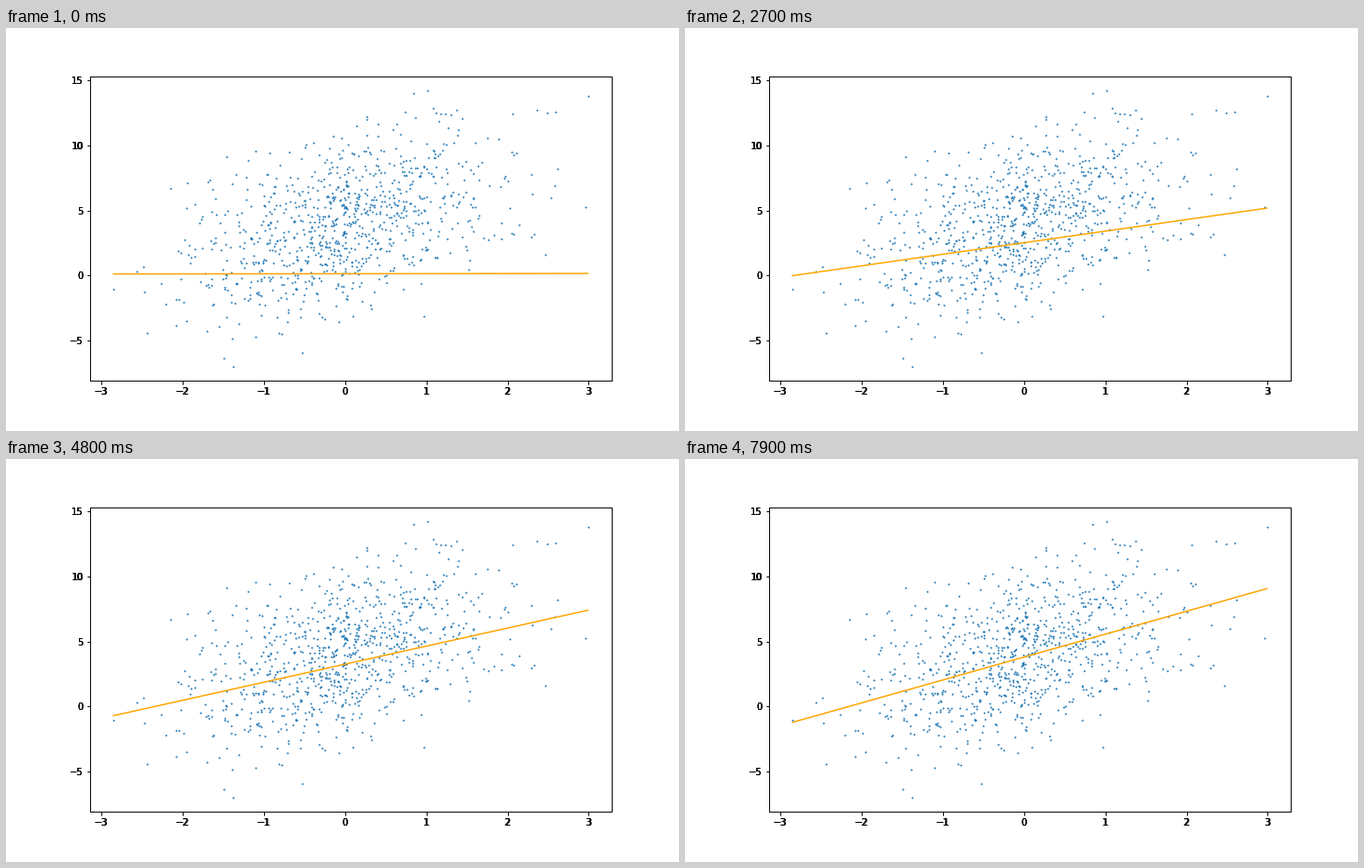
Animation, 720 px wide and 432 px high, one loop 8 s. Source, as a matplotlib script:

```python
import numpy as np
import matplotlib.pyplot as plt
from matplotlib.animation import FuncAnimation

FRAMES, INTERVAL = 80, 100
XLIM, YLIM = (-3.138, 3.282), (-8.065, 15.316)
BOX = (0.125, 0.125, 0.775, 0.755)

# Extreme points that set the outline of the cloud
EXTREMES = [(-2.85, -1.05), (-1.38, -7.0), (3.0, 13.8), (2.96, 5.25),
            (1.02, 14.2), (0.84, 14.0), (2.49, 12.5), (2.62, 8.2),
            (2.46, 1.6), (0.97, -3.1), (-2.44, -4.4), (-0.53, -5.9)]

# Early poses of the line: step, height at its left and right end
POSES = np.array([(0, 0.13, 0.17), (9, -0.18, 3.62),
                  (11, -0.05, 2.85), (27, 0.0, 5.19)])
GOAL = np.array([-1.6, 10.35])
DECAY = 0.9735


def cloud(count):
    """Linear trend with bounded normal noise."""
    rng = np.random.default_rng(7)
    x = rng.normal(0.05, 1, 2 * count)
    noise = rng.normal(0, 3.3, x.size)
    y = 4 + 1.8 * x + noise
    keep = (np.abs(x) < 2.6) & (np.abs(noise) < 7.8) & (y < 12.9)
    return x[keep][:count], y[keep][:count]


def add_axes(dx=0):
    left, bottom, width, height = BOX
    ax = fig.add_axes((left + dx, bottom, width, height))
    ax.patch.set_visible(False)
    ax.set(xlim=XLIM, ylim=YLIM, xticks=range(-3, 4), yticks=range(-5, 16, 5))
    return ax


def line_ends(step):
    """Early poses, then an exponential approach to the best fit."""
    steps, *ends = POSES.T
    pose = np.array([np.interp(step, steps, end) for end in ends])
    return GOAL + (pose - GOAL) * DECAY ** max(0, step - steps[-1])


plt.rcParams["font.family"] = "DejaVu Sans"
fig = plt.figure(figsize=(10, 6), dpi=72, facecolor="white")

# Slightly shifted labels underneath give the heavy lettering
ghost = add_axes(dx=-0.7 / 720)
ghost.spines[:].set_visible(False)
ghost.tick_params(length=0, pad=7)
add_axes()
ax = add_axes()

for xs, ys in (cloud(920), zip(*EXTREMES)):
    ax.scatter(xs, ys, s=1, color="#1f77b4")
line, = ax.plot([-2.85, 2.99], line_ends(0), color="orange", lw=1.5)


def update(i):
    line.set_ydata(line_ends(i))
    return line,


anim = FuncAnimation(fig, update, frames=FRAMES, interval=INTERVAL,
                     repeat=True, repeat_delay=0)
plt.show()
```
